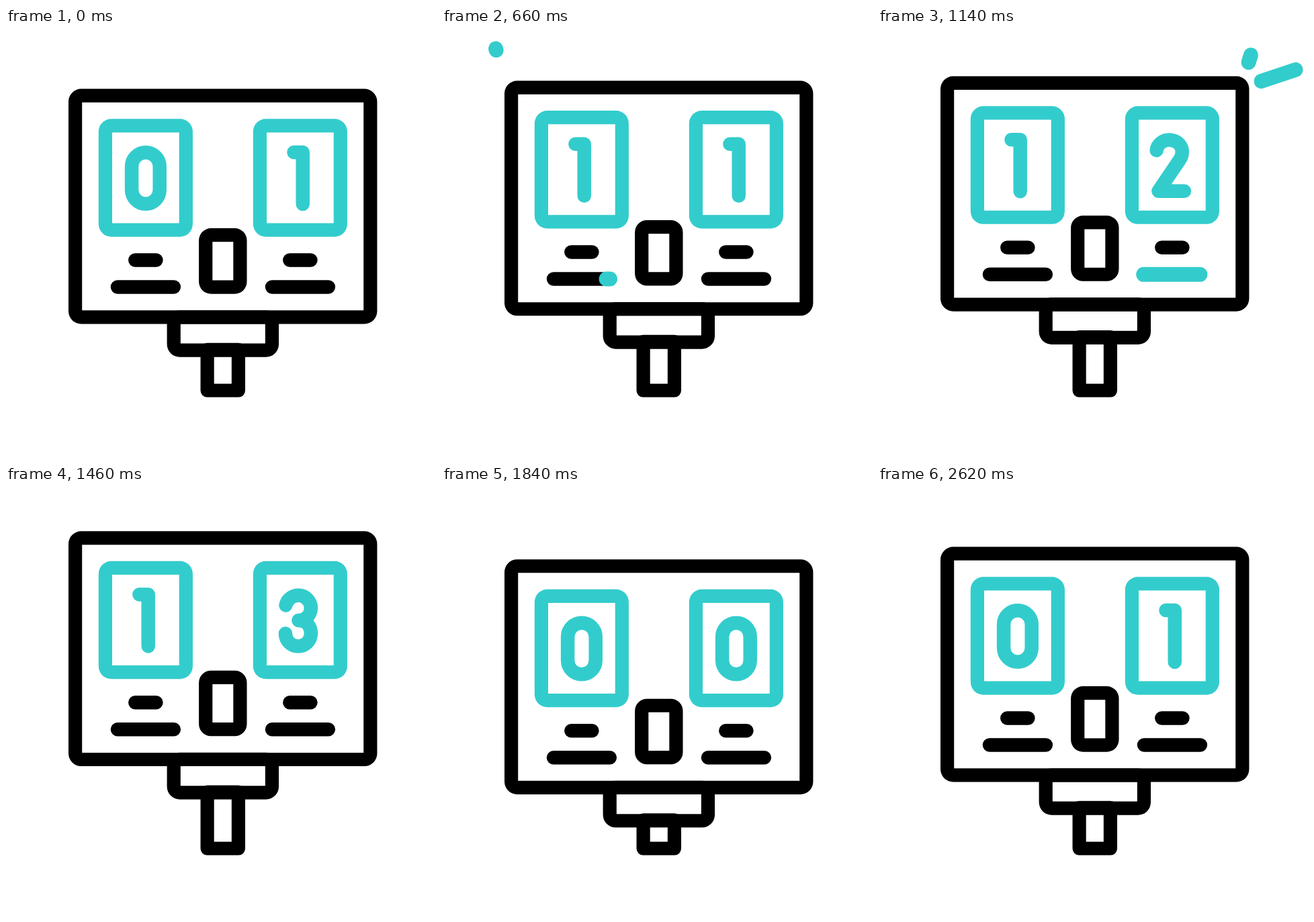
Recreate the animation shown at these times as an HTML page with a canvas. Size 640 by 640 pixels, loop 2.88 s.

```html
<!DOCTYPE html>
<html>
<head>
<meta charset="utf-8">
<title>Scoreboard</title>
<style>
html, body { margin: 0; width: 100%; height: 100%; overflow: hidden; background: #fff; }
canvas { display: block; }
</style>
</head>
<body>
<canvas id="stage" width="640" height="640"></canvas>
<script>
const ctx = document.getElementById('stage').getContext('2d');
const LOOP = 2880, BEAT = 620, FIRST_POINT = 460, RESET = 1700;
const BLACK = '#000', TEAL = '#33cccc', BORDER = 20.2;

// Turning points of the board's bobbing: [time, offset]
const turns = [[200, 0], [520, -21], [820, -1.5], [1355, -28], [1880, 19.2], [2470, 0]];

const digits = [
  'M-20.8 206a20.8 20.8 0 0 1 41.6 0v35a20.8 20.8 0 0 1-41.6 0z',
  'M-9.5 185H3.8V262',
  'M-23.3 201A19 17 0 0 1 14.7 204Q14.7 210 11 215L-20.5 261.5H18',
  'M-21.5 201A19 19 0 0 1 16 204C16 214 10 223.5-2.5 223.5C10 223.5 16 233 16 243A19 19 0 0 1-22 243'
].map(d => new Path2D(d));

const ramp = (t, from, to) => Math.min(1, Math.max(0, (t - from) / (to - from)));
const ease = u => (1 - Math.cos(Math.PI * u)) / 2;

function boardOffset(t) {
  let y = 0;
  for (let i = 1; i < turns.length; i++) {
    const [t0, y0] = turns[i - 1], [t1, y1] = turns[i];
    y += (y1 - y0) * ease(ramp(t, t0, t1));
  }
  return y;
}

function scores(t) {
  const since = beats => t >= FIRST_POINT + beats * BEAT;
  return t < RESET ? [+since(0), 1 + since(1) + since(1.5)] : [0, +since(3)];
}

// Rounded outside, square inside
function frame(color, x0, y0, x1, y1, radius) {
  const w = x1 - x0, h = y1 - y0;
  ctx.fillStyle = color;
  ctx.beginPath();
  ctx.roundRect(x0, y0, w, h, radius);
  ctx.rect(x0 + BORDER, y0 + BORDER, w - 2 * BORDER, h - 2 * BORDER);
  ctx.fill('evenodd');
}

function line(color, width, x0, y0, x1, y1) {
  ctx.strokeStyle = color;
  ctx.lineWidth = width;
  ctx.beginPath();
  ctx.moveTo(x0, y0);
  ctx.lineTo(x1, y1);
  ctx.stroke();
}

// Line that grows from its first end, then vanishes towards its second
function trimmed(t, growFrom, growTo, fadeFrom, fadeTo, x, y, dx, dy) {
  if (t <= growFrom || t >= fadeTo) return;
  const head = ramp(t, growFrom, growTo), tail = ramp(t, fadeFrom, fadeTo);
  line(TEAL, 22, x + dx * tail, y + dy * tail, x + dx * head, y + dy * head);
}

// Underline and two sparks beside the scoring team; t counts from the point
function cheer(t, side) {
  const x = offset => 320 + side * offset;
  trimmed(t, -108, 30, 70, 210, side > 0 ? 395.2 : 166, 385.7, 84, 0);
  trimmed(t, -65, 50, 65, 170, x(250.5), 98, side * 51, -17);
  trimmed(t, 35, 100, 100, 210, x(231.5), 70, side * 8.5, -27);
}

function digit(value, x) {
  ctx.save();
  ctx.translate(x, 0);
  ctx.strokeStyle = TEAL;
  ctx.lineWidth = 20.5;
  ctx.stroke(digits[value]);
  ctx.restore();
}

function draw(t) {
  const dy = boardOffset(t);
  ctx.fillStyle = '#fff';
  ctx.fillRect(0, 0, 640, 640);
  ctx.lineCap = ctx.lineJoin = 'round';

  frame(BLACK, 289.5, 468.8 + dy, 356, 549.6, 10);

  ctx.save();
  ctx.translate(0, dy);
  frame(BLACK, 239.6, 420.2, 406, 489.8, 19);
  frame(BLACK, 93, 90.6, 552.4, 440.5, 19);
  frame(BLACK, 287.1, 298.1, 358.5, 395.7, 18);
  scores(t).forEach((score, i) => {
    const x = i * 230;
    frame(TEAL, 137.8 + x, 135.2, 277.9 + x, 310.7, 19);
    line(BLACK, 20.5, 192.3 + x, 345.6, 223.4 + x, 345.6);
    line(BLACK, 20.5, 166 + x, 385.6, 249.8 + x, 385.6);
    digit(score, 207.9 + x);
  });
  for (const [beat, side] of [[0, -1], [1, 1], [3, 1]]) cheer(t - FIRST_POINT - beat * BEAT, side);
  ctx.restore();
}

function tick() {
  draw(performance.now() % LOOP);
  requestAnimationFrame(tick);
}
tick();
</script>
</body>
</html>
```
